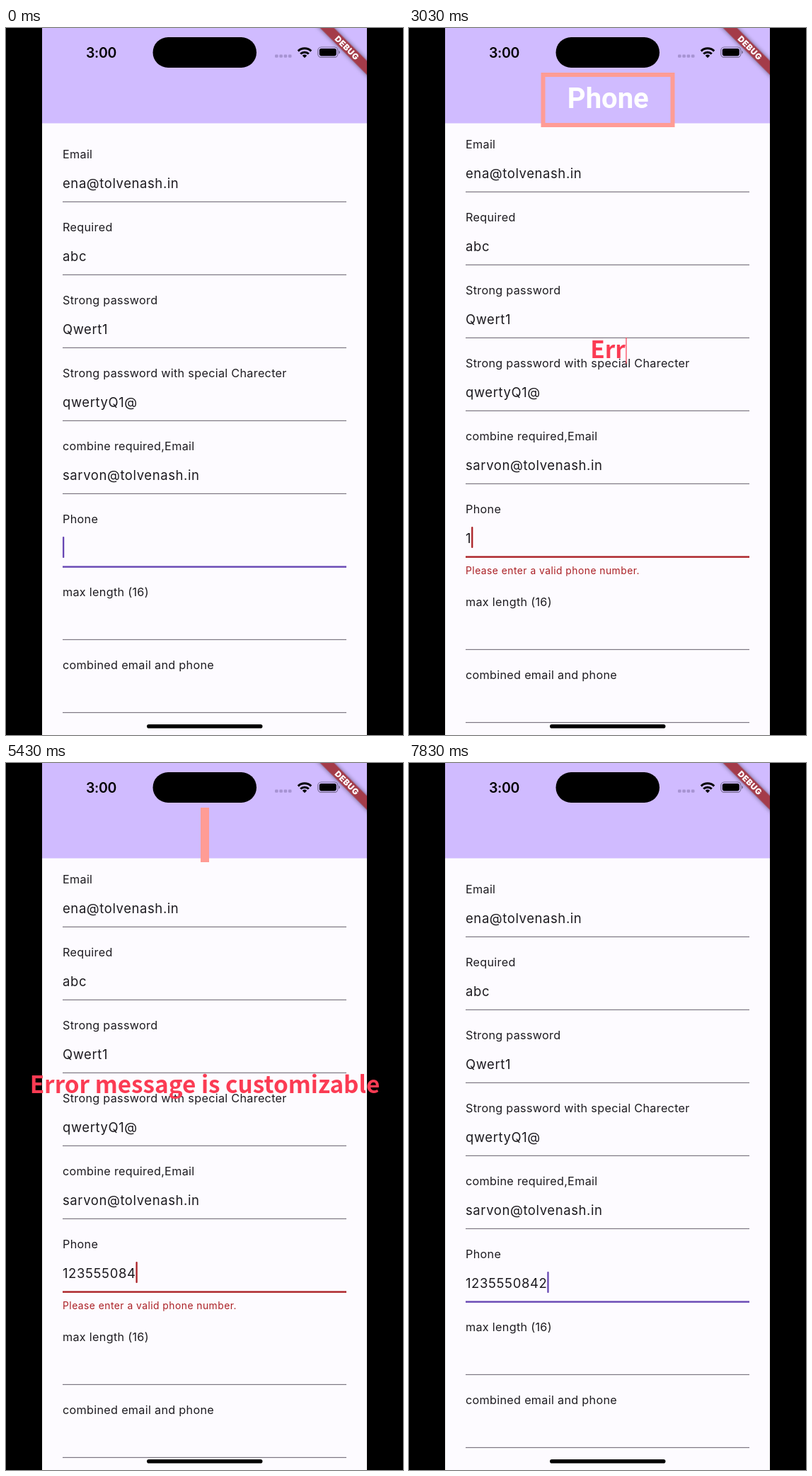
An HTML page that plays this animation: 561 px wide and 998 px high, repeating every 7.86 s.

```html
<!DOCTYPE html>
<html lang="en">
<head>
<meta charset="utf-8">
<title>Form validation demo</title>
<style>
  html, body { margin: 0; width: 100%; height: 100%; overflow: hidden; background: #000; }
  svg { display: block; width: 100%; height: 100%; }
  text { font-family: Inter, Roboto, sans-serif; fill: #1d1b20; white-space: pre; }
  .label { font-size: 16.2px; letter-spacing: .3px; }
  .value { font-size: 18.5px; letter-spacing: .58px; }
  .rule { fill: #7c7782; }
  .focus { fill: #6746b3; }
  .bad { fill: #ab2025; }
  #message { font-size: 13.85px; letter-spacing: .47px; fill: #ab2025; }
  #clock { font-size: 19.5px; font-weight: 600; letter-spacing: -.3px; fill: #000; }
  #title { font: 700 40px Roboto, sans-serif; fill: #fff; }
  #caption { font: 700 33.3px "Noto Sans CJK SC", "Noto Sans CJK JP", "Noto Sans CJK", "Noto Sans", sans-serif; fill: #fb3b53; }
  #banner rect { fill: #a43b49; filter: drop-shadow(0 0 3px rgba(0, 0, 0, .5)); }
  #banner text { font-size: 11.6px; font-weight: 900; letter-spacing: .5px; fill: #fff; }
</style>
</head>
<body>
<svg viewBox="0 0 561 998" preserveAspectRatio="none">
  <defs>
    <clipPath id="phone"><rect x="51" width="459" height="998"/></clipPath>
    <clipPath id="reveal"><rect id="window" y="63" height="77"/></clipPath>
  </defs>

  <g clip-path="url(#phone)">
    <rect x="51" width="459" height="998" fill="#fdfbff"/>
    <g id="form"></g>
    <rect x="51" width="459" height="134.5" fill="#d0bbff"/>

    <text id="clock" x="134.5" y="41.5" text-anchor="middle">3:00</text>
    <rect x="207.5" y="13" width="146.5" height="43" rx="21.5"/>
    <g fill="#a693d2">
      <rect x="380" y="37.5" width="4.6" height="4.2" rx="1.3"/>
      <rect x="386.3" y="37.5" width="4.6" height="4.2" rx="1.3"/>
      <rect x="392.6" y="37.5" width="4.6" height="4.2" rx="1.3"/>
      <rect x="398.9" y="37.5" width="4.6" height="4.2" rx="1.3"/>
    </g>
    <g fill="none" stroke="#000" stroke-width="3">
      <path d="M412.8 32.6a13.2 13.2 0 0 1 18.4 0"/>
      <path d="M416.2 36.5a8.3 8.3 0 0 1 11.6 0"/>
    </g>
    <path d="M422 42.2l-3.2-3.3a4.5 4.5 0 0 1 6.4 0z"/>
    <rect x="440.8" y="27" width="28" height="14.4" rx="4.6" fill="none" stroke="#000" stroke-opacity=".42" stroke-width="1.2"/>
    <rect x="442.8" y="29" width="24" height="10.4" rx="2.8"/>
    <path d="M470.3 31.8a2.6 2.6 0 0 1 0 4.8z" opacity=".45"/>

    <g id="banner" transform="translate(510 0) rotate(45)">
      <rect x="-60" y="32.7" width="120" height="14"/>
      <text x="0" y="43.9" text-anchor="middle">DEBUG</text>
    </g>
    <rect x="199" y="983" width="163.5" height="5.6" rx="2.8"/>
  </g>

  <g clip-path="url(#reveal)">
    <text id="title" x="281.3" y="112.5" text-anchor="middle">Phone</text>
  </g>
  <rect id="frame" fill="none" stroke="#ff9c95" stroke-width="6"/>
  <text id="caption" x="281" y="465.5" text-anchor="middle"></text>
  <rect id="beam" y="437" width="1.2" height="37" fill="#fb3b53"/>
</svg>

<script>
const LOOP = 7860;
const PHONE_ROW = 5;
const PHONE = "1235550842";
const CAPTION = "Error message is customizable";
const KEYS = [1730, 3500, 3900, 4250, 4450, 4830, 5000, 5200, 5390, 6130];
const INVALID = KEYS[0], VALID = KEYS[9], FADE = 170;
const FIELDS = [
  ["Email", "ena@tolvenash.in"],
  ["Required", "abc"],
  ["Strong password", "Qwert1"],
  ["Strong password with special Charecter", "qwertyQ1@"],
  ["combine required,Email", "sarvon@tolvenash.in"],
  ["Phone", ""],
  ["max length (16)", ""],
  ["combined email and phone", ""]
];

const $ = id => document.getElementById(id);
const clamp = v => Math.min(1, Math.max(0, v));
const ramp = (t, from, to) => clamp((t - from) / (to - from));

function set(node, attrs) {
  for (const key in attrs) node.setAttribute(key, attrs[key]);
}

function add(parent, tag, attrs, content = "") {
  const node = document.createElementNS("http://www.w3.org/2000/svg", tag);
  set(node, attrs);
  node.textContent = content;
  return parent.appendChild(node);
}

function write(node, content) {
  if (node.textContent !== content) node.textContent = content;
}

const rows = FIELDS.map(([label, value], i) => {
  const row = add($("form"), "g", {});
  const y = 245 + 103 * i;
  add(row, "text", { class: "label", x: 80, y: y - 61 }, label);
  const input = add(row, "text", { class: "value", x: 80, y: y - 19 }, value);
  if (i !== PHONE_ROW) add(row, "rect", { class: "rule", x: 80, y: y - .2, width: 401, height: 1.2 });
  return { row, input, y };
});

// Each colour of the active field is a layer, so the states can cross-fade.
const { row: phoneRow, input: phoneInput, y: phoneY } = rows[PHONE_ROW];
const layers = ["focus", "bad"].map(name => {
  const layer = add(phoneRow, "g", { class: name });
  add(layer, "rect", { x: 80, y: phoneY - .6, width: 401, height: 2.4 });
  const caret = add(layer, "rect", { y: phoneY - 42, width: 2.3, height: 30, rx: 1 });
  return { layer, caret };
});
const message = add(phoneRow, "text", { id: "message", x: 80 }, "Please enter a valid phone number.");

function caretOpacity(t) {
  const start = KEYS.filter(k => k <= t).pop() ?? -137;
  const period = start === VALID ? 860 : 1000;
  const p = ((t - start) / period) % 1;
  const level = p < .75 ? 1 - ramp(p, .5, .65) : ramp(p, .85, 1);
  return Math.ceil(level * 4) / 4;
}

function drawForm(t) {
  const shifted = t >= INVALID && t < VALID + FADE;
  rows.forEach(({ row }, i) => {
    const dy = !shifted ? 0 : i <= PHONE_ROW ? -14 : 14;
    set(row, { transform: `translate(0 ${dy})` });
  });

  const count = KEYS.filter(k => k <= t).length;
  write(phoneInput, PHONE.slice(0, count));
  const x = 80 + (count ? phoneInput.getComputedTextLength() : 0);
  const error = ramp(t, INVALID, INVALID + FADE) * (1 - ramp(t, VALID, VALID + FADE));
  const blink = caretOpacity(t);
  layers.forEach(({ layer, caret }, i) => {
    set(layer, { opacity: i ? error : 1 - error });
    set(caret, { x, opacity: blink });
  });
  set(message, { y: phoneY + 24.5 - 4 * (1 - error), opacity: error });
}

function drawTitle(t) {
  const tall = ramp(t, 500, 800) * (1 - ramp(t, 5530, 5830));
  const opened = 1 - (1 - ramp(t, 850, 1450)) ** 2;
  const closed = ramp(t, 4830, 5430) ** 2;
  const width = 12 + 177 * opened * (1 - closed);
  const height = 77 * tall;
  const left = 281 - width / 2;
  set($("frame"), {
    x: left + 3, y: 101.5 - height / 2 + 3,
    width: width - 6, height: Math.max(0, height - 6),
    visibility: height > 6 ? "visible" : "hidden"
  });
  set($("window"), { x: left + 6, width: Math.max(0, width - 12) });
}

function drawCaption(t) {
  const typed = Math.floor((t - 2875) / 49.5);
  const erased = Math.max(0, Math.floor((t - 6975) / 29));
  const count = Math.max(0, Math.min(CAPTION.length, typed) - erased);
  write($("caption"), CAPTION.slice(0, count));
  const half = count ? $("caption").getComputedTextLength() / 2 : 0;
  const active = (t >= 2875 && t < 4540) || t >= 6870;
  set($("beam"), {
    x: 281 + half + .6,
    visibility: active && count ? "visible" : "hidden"
  });
}

function draw() {
  const t = performance.now() % LOOP;
  drawForm(t);
  drawTitle(t);
  drawCaption(t);
  requestAnimationFrame(draw);
}
draw();
</script>
</body>
</html>
```
